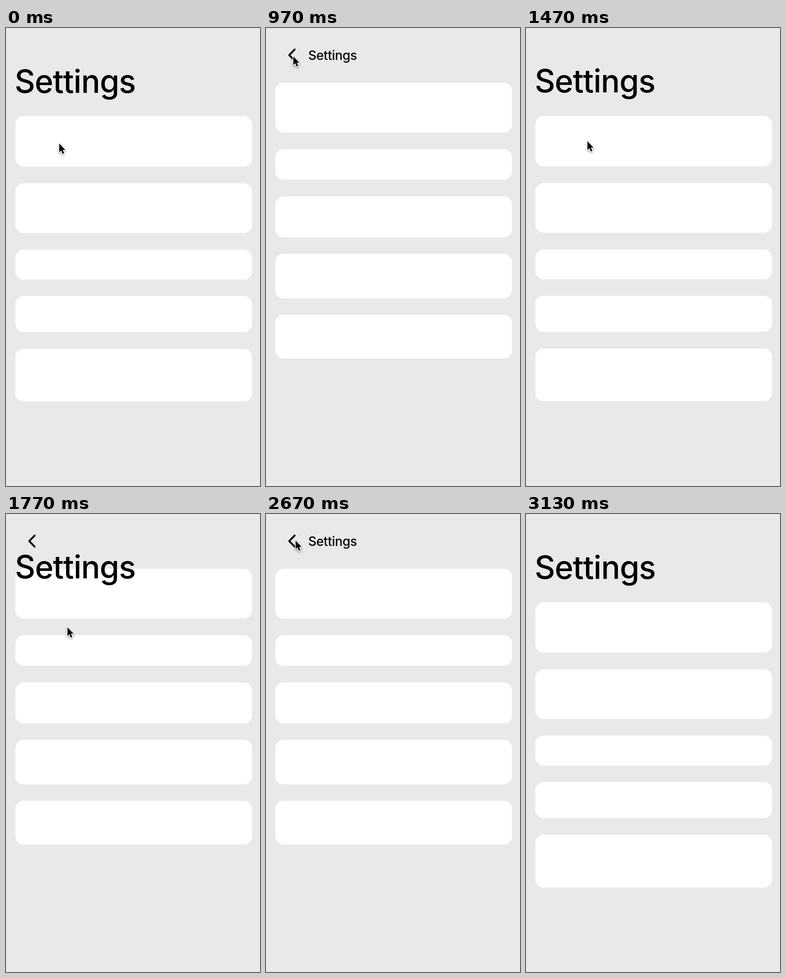
An HTML page with a canvas for the animation above (3.63 s loop, 558 by 1003 pixels).

```html
<!DOCTYPE html>
<html lang="en">
<head>
<meta charset="utf-8">
<title>Settings</title>
<style>
  html, body { margin: 0; width: 100%; height: 100%; overflow: hidden; background: #e9e9eb; }
  canvas { display: block; }
</style>
</head>
<body>
<canvas id="stage" width="558" height="1003"></canvas>
<script>
const ctx = document.getElementById('stage').getContext('2d');
const LOOP = 3630;

// Cards as [top, bottom]
const LIST = [[193, 303.5], [340, 449], [485.5, 551], [587, 666], [702.5, 818]];
const DETAIL = [[120, 229], [265.5, 332.5], [369, 458.5], [494.5, 592], [628, 724]];
const SHIFT = 73;

const LARGE = { x: 22, y: 141.5, w: 261 };
const SMALL = { x: 94, y: 69.5, w: 105 };

// Page changes in order of time
const SWITCHES = [
  { at: -1000, open: false },
  { at: 240, open: true },
  { at: 1063, open: false },
  { at: 1765, open: true },
  { at: 2701, open: false }
];

const easeOut = u => 1 - (1 - u) ** 4;
const easeBoth = u => u * u * (3 - 2 * u);
const linear = u => u;

// Pointer moves: start, end, target x, target y, easing
const MOVES = [
  [440, 830, 60, 62, easeOut],
  [1205, 1265, 64, 29, easeBoth],
  [1265, 1465, 135, 248, easeBoth],
  [2160, 2640, 65, 58, easeBoth],
  [2715, 2850, 70, 4, linear]
];
const POINTER_GONE = 2860;

const mix = (a, b, p) => a + (b - a) * p;

// Part of the way still to go in a critically damped spring
function remaining(ms) {
  const x = 0.017 * ms;
  return x > 7.2 ? 0 : (1 + x) * Math.exp(-x);
}

function drawCards(cards, dy) {
  ctx.fillStyle = '#fff';
  for (const [top, bottom] of cards) {
    ctx.beginPath();
    ctx.roundRect(20.5, top + dy, 520, bottom - top, 18);
    ctx.fill();
  }
}

function drawTitle(x, y, width) {
  const text = 'Settings';
  ctx.font = '500 70px Inter, "Noto Sans", sans-serif';
  ctx.letterSpacing = '-1px';
  const m = ctx.measureText(text);
  const left = m.actualBoundingBoxLeft;
  const scale = width / (left + m.actualBoundingBoxRight);
  ctx.save();
  ctx.translate(x, y);
  ctx.scale(scale, scale);
  ctx.fillStyle = '#000';
  ctx.fillText(text, left, 0);
  ctx.restore();
}

function drawChevron() {
  ctx.beginPath();
  ctx.moveTo(63, 47);
  ctx.lineTo(51, 59.3);
  ctx.lineTo(63, 71.6);
  ctx.strokeStyle = '#000';
  ctx.lineWidth = 4;
  ctx.lineCap = ctx.lineJoin = 'round';
  ctx.stroke();
}

function drawPointer(x, y) {
  const arrow = new Path2D('M0 0V19.2L4.3 15.3L7.3 22.6L10.7 21.2L7.7 14H13.3Z');
  ctx.save();
  ctx.translate(x, y);
  ctx.lineJoin = 'round';
  ctx.lineWidth = 3;
  ctx.strokeStyle = '#fff';
  ctx.shadowColor = 'rgba(0,0,0,.4)';
  ctx.shadowBlur = 4;
  ctx.shadowOffsetY = 2;
  ctx.stroke(arrow);
  ctx.shadowColor = 'transparent';
  ctx.fillStyle = '#000';
  ctx.fill(arrow);
  ctx.restore();
}

function pointerAt(t) {
  let x = 117, y = 253;
  for (const [start, end, tx, ty, ease] of MOVES) {
    if (t < start) break;
    const p = ease(Math.min(1, (t - start) / (end - start)));
    x = mix(x, tx, p);
    y = mix(y, ty, p);
  }
  return [x, y];
}

function draw(t) {
  const { at, open } = SWITCHES.findLast(s => s.at <= t);
  const r = remaining(t - at);
  const [from, to] = open ? [LARGE, SMALL] : [SMALL, LARGE];

  ctx.fillStyle = '#e9e9eb';
  ctx.fillRect(0, 0, 558, 1003);
  if (open) {
    drawCards(DETAIL, 0);
    drawChevron();
  } else {
    drawCards(LIST, -SHIFT * r);
  }
  drawTitle(
    mix(to.x, from.x, r ** 1.2),
    mix(to.y, from.y, r ** (open ? 1.3 : 0.92)),
    mix(to.w, from.w, r)
  );
  if (t < POINTER_GONE) drawPointer(...pointerAt(t));
}

const start = performance.now();
function tick() {
  draw((performance.now() - start) % LOOP);
  requestAnimationFrame(tick);
}
tick();
</script>
</body>
</html>
```
